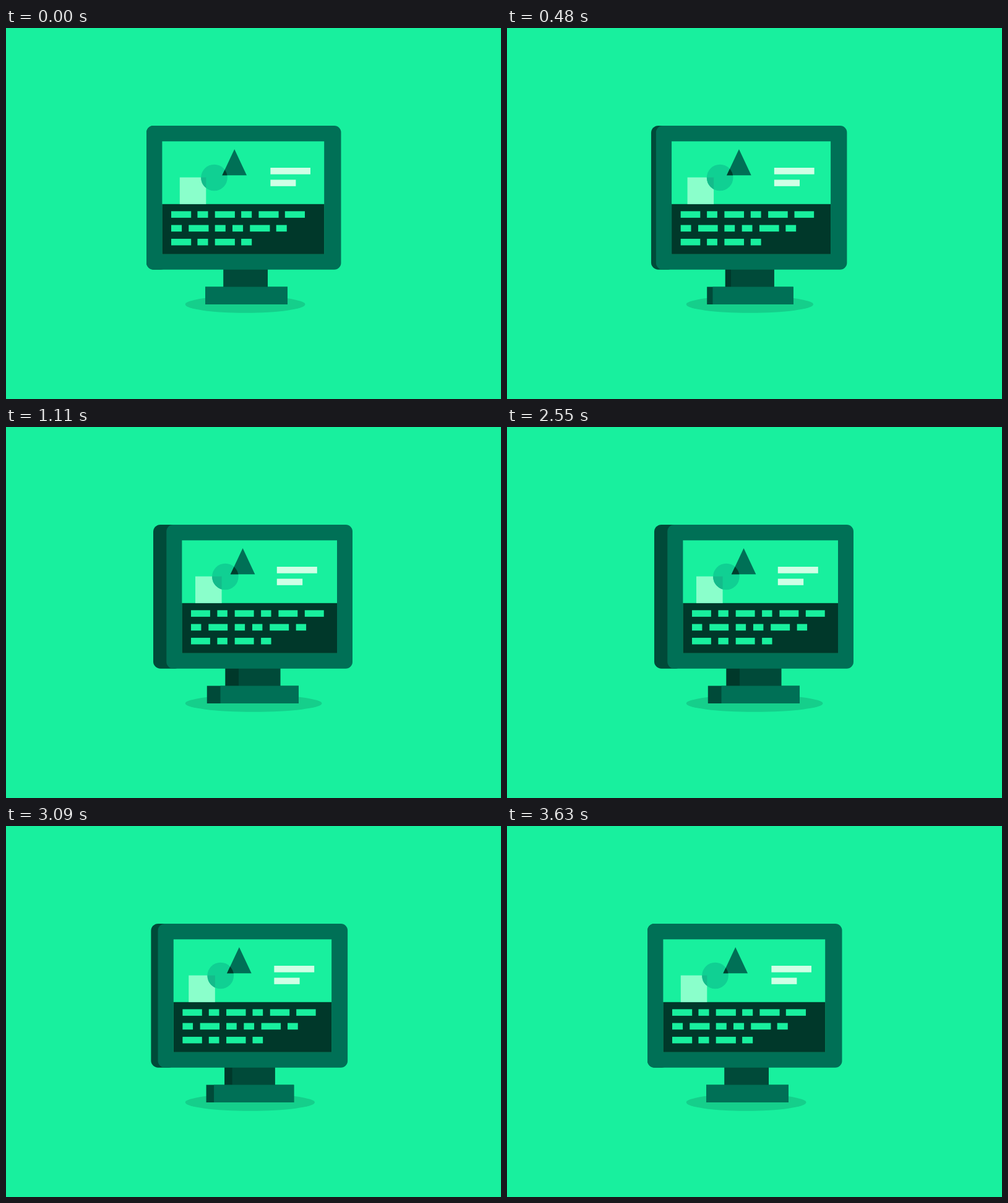
Recreate the animation shown at these times as an HTML page. Size 800 by 600 pixels, loop 4.53 s.

```html
<!DOCTYPE html>
<html lang="en">
<head>
<meta charset="utf-8">
<title>Turning monitor</title>
<style>
  html, body { margin: 0; width: 100%; height: 100%; overflow: hidden; background: #18f09e; }
  svg { display: block; width: 100%; height: 100%; }
</style>
</head>
<body>
<svg id="stage" viewBox="0 0 800 600">
  <defs><clipPath id="lens"><circle id="lensDisc" cy="242" r="21.3"/></clipPath></defs>
</svg>
<script>
const LOOP = 4530, STEP = 30, TURN = 1110, MIDDLE = 1815, HOLD = 705;
const FRAME = '#007056', SIDE = '#004a39', DEEP = '#00382a', BG = '#18f09e';
const stage = document.getElementById('stage');
const lensDisc = document.getElementById('lensDisc');

function add(tag, attrs, parent = stage) {
  const el = document.createElementNS('http://www.w3.org/2000/svg', tag);
  for (const key in attrs) el.setAttribute(key, attrs[key]);
  parent.appendChild(el);
  return el;
}
const mix = (a, b, p) => a + (b - a) * p;

// A block spans x from left to right; each edge is a [facing, turned] pair.
const blocks = [];
function block(left, right, top, bottom, fill, rx = 0, parent = stage) {
  const el = add('rect', { y: top, height: bottom - top, fill, rx }, parent);
  blocks.push({ el, left, right });
}

const shadow = add('ellipse', { cy: 447, ry: 13.7, fill: '#15cf8b' });

// Stand
block([351.5, 354.3], [423, 443.3], 390, 419, DEEP);
block([351.5, 376], [423, 443.3], 390, 419, SIDE);
block([322, 324.8], [455, 473], 418.6, 447, SIDE);
block([322, 346.5], [455, 473], 418.6, 447, FRAME);

// Casing and screen
const back = add('rect', { y: 158, height: 232.7, rx: 11.5, fill: SIDE });
block([227, 259.3], [541.5, 560], 158, 390.7, FRAME, 11);
block([252.4, 284.4], [514.2, 535], 183.3, 365.8, BG);
block([252.4, 284.4], [514.2, 535], 284.8, 365.8, DEEP);

// Picture on the screen
const SQUARE = [[280.8, 306], [323.3, 348.6], 241.6, 284.8];
block(...SQUARE, '#8affcb');
const disc = add('circle', { cy: 242, r: 21.3, fill: '#10d093' });
const overlaps = add('g', { 'clip-path': 'url(#lens)' });
block(...SQUARE, '#14bb8b', 0, overlaps);
const triangle = add('path', { d: 'M0 196L19.8 238.3H-19.8Z', fill: FRAME });
const darkOverlap = add('g', { 'clip-path': 'url(#lens)' });
const triangleOverlap = add('path', { d: 'M0 196L19.8 238.3H-19.8Z', fill: '#003e2d' }, darkOverlap);
block([427.4, 437.8], [492, 502.8], 226, 236.6, '#d0ffe6');
block([427.4, 437.8], [468.4, 479.2], 245.4, 255.8, '#d0ffe6');

// Code lines: word lengths in grid cells, one cell of pause included
[[3, 2, 3, 2, 3, 3], [2, 3, 2, 2, 3, 2], [3, 2, 3, 2]].forEach((words, row) => {
  let x = 267, y = 296.3 + row * 22.3;
  for (const cells of words) {
    const width = cells === 3 ? 32.2 : 17.1;
    block([x, x + 32], [x + width, x + 32 + width * 0.96], y, y + 10.6, BG);
    x += cells * 14.14;
  }
});

// Bezier ease with control points (0.69, 0) and (0.42, 1)
function ease(x) {
  if (x <= 0) return 0;
  if (x >= 1) return 1;
  let lo = 0, hi = 1;
  for (let i = 0; i < 30; i++) {
    const s = (lo + hi) / 2, r = 1 - s;
    if (3 * r * r * s * 0.69 + 3 * r * s * s * 0.42 + s * s * s < x) lo = s;
    else hi = s;
  }
  return lo * lo * (3 - 2 * lo);
}

function draw(time) {
  const t = Math.floor((time % LOOP) / STEP) * STEP;
  const p = 1 - ease((Math.abs(t - MIDDLE) - HOLD) / TURN);

  for (const { el, left, right } of blocks) {
    const x = mix(...left, p);
    el.setAttribute('x', x);
    el.setAttribute('width', mix(...right, p) - x);
  }

  const backLeft = mix(227, 238, p ** 0.72);
  back.setAttribute('x', backLeft);
  back.setAttribute('width', mix(262, 284, p) - backLeft);

  const radius = mix(96.9, 110.4, p);
  shadow.setAttribute('cx', 289.7 + radius);
  shadow.setAttribute('rx', radius);

  const discX = mix(336.5, 354.4, p);
  disc.setAttribute('cx', discX);
  lensDisc.setAttribute('cx', discX);
  const shift = `translate(${mix(369.2, 382.6, p)} 0)`;
  triangle.setAttribute('transform', shift);
  triangleOverlap.setAttribute('transform', shift);
}

const start = performance.now();
function tick() {
  draw(performance.now() - start);
  requestAnimationFrame(tick);
}
tick();
</script>
</body>
</html>
```
